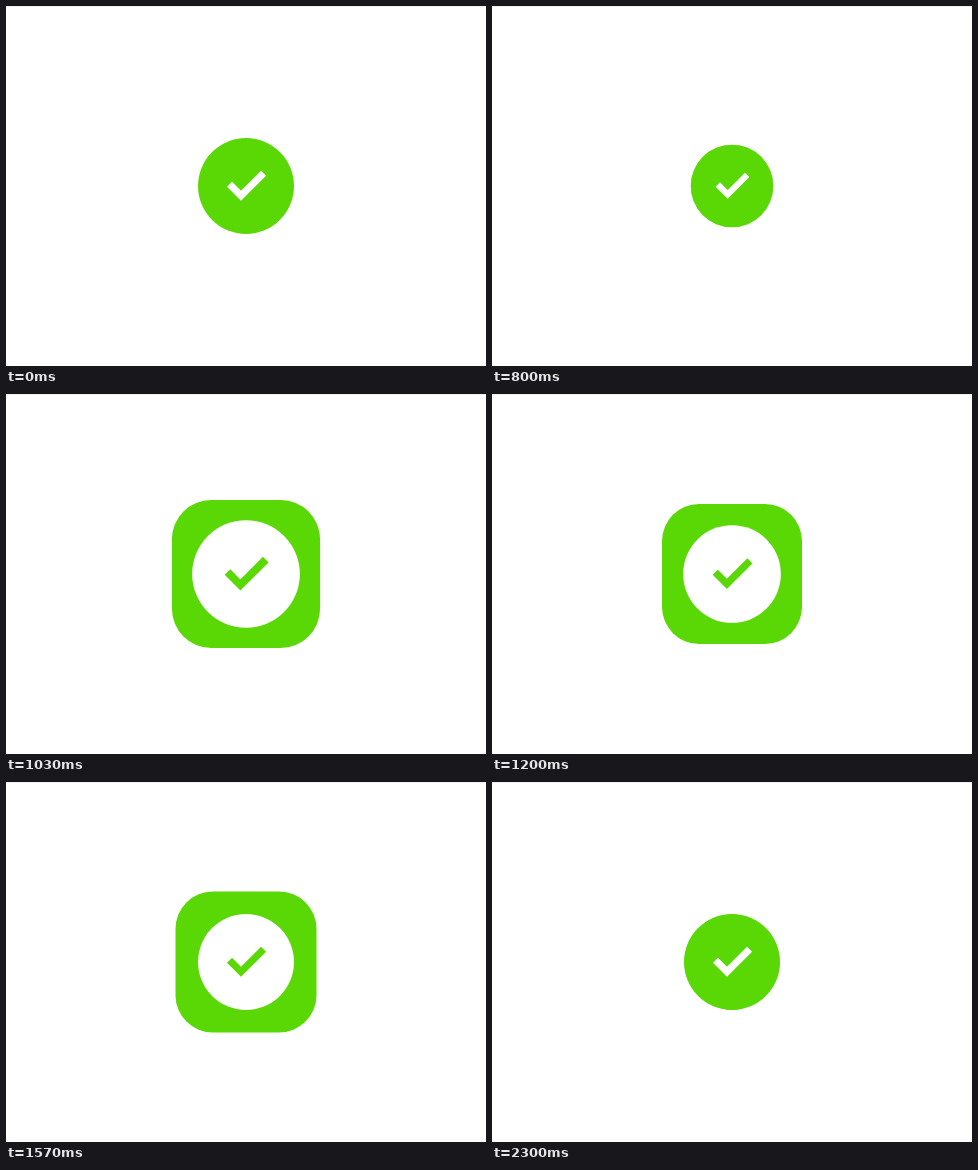
Write an HTML page that moves like this. It is 480 px wide and 360 px high and loops after 2.41 s.

```html
<!DOCTYPE html>
<html lang="en">
<head>
<meta charset="utf-8">
<title>Check toggle</title>
<style>
  html, body { margin: 0; width: 100%; height: 100%; overflow: hidden; background: #fff; }
  svg { display: block; width: 100%; height: 100%; }
</style>
</head>
<body>
<svg viewBox="0 0 480 360">
  <rect width="480" height="1" fill="#f0f0f0"/>
  <g transform="translate(240 180)">
    <rect id="tile" fill="#5ad805"/>
    <g id="badge">
      <circle id="disc" r="48"/>
      <path id="check" d="M-16.5-1.75L-5 9.75L17.6-12.85" fill="none" stroke-width="7.1"/>
    </g>
  </g>
</svg>
<script>
const LOOP = 2410, STEP = 1000 / 30;
const FIRST = 14, LAST = 69;   // steps between which anything moves
const [tile, badge, disc, check] =
  ['tile', 'badge', 'disc', 'check'].map(id => document.getElementById(id));

// Smooth progress from 0 to 1 between two steps
function phase(step, from, to) {
  const x = Math.min(1, Math.max(0, (step - from) / (to - from)));
  return x * x * (3 - 2 * x);
}

// Green at 0, white at 1
const tint = white =>
  `rgb(${[90, 216, 5].map(c => Math.round(c + (255 - c) * white))})`;

function setAttributes(element, values) {
  for (const name in values) element.setAttribute(name, values[name]);
}

function draw(time) {
  const current = Math.floor((time % LOOP + 4) / STEP);
  const step = current < FIRST || current > LAST ? 0 : current;
  const during = (from, to) => phase(step, from, to);

  // The badge is pressed in, pops out too far and settles
  const scale = 1 - .14 * during(11, 24) + .28 * during(24, 29) - .14 * during(29, 38);

  // The tile bursts out from behind it, falls back and finally shrinks away
  const shrink = during(59.5, LAST);
  const size = 82 + 69 * during(26, 29) - 11 * during(29, 35) + during(35, 47) - 46 * shrink;
  const corner = .5 - .235 * (during(25, 28.5) - shrink);

  const fade = during(61, LAST);
  setAttributes(tile, {
    x: -size / 2, y: -size / 2, width: size, height: size, rx: size * corner
  });
  setAttributes(badge, { transform: `scale(${scale})` });
  setAttributes(disc, { fill: tint(during(25.5, 29) - fade) });
  setAttributes(check, { stroke: tint(1 - during(25, 28) + fade) });
}

const start = performance.now();
function tick() {
  draw(performance.now() - start);
  requestAnimationFrame(tick);
}
tick();
</script>
</body>
</html>
```
